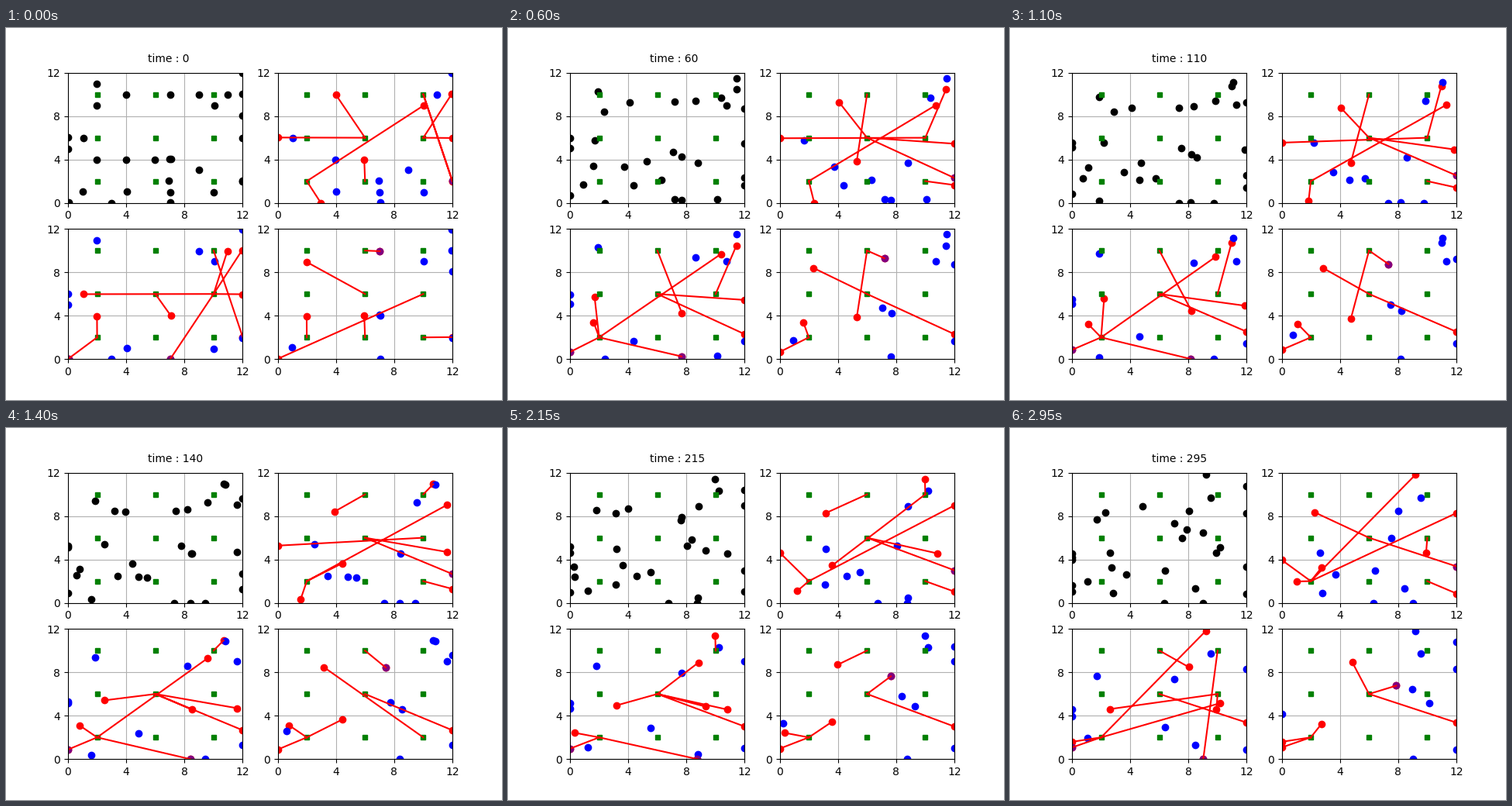
These frames come from a looping animation (640 by 480 pixels, 3000 ms). A matplotlib script:

```python
import matplotlib.pyplot as plt
import numpy as np
from matplotlib.animation import FuncAnimation

FRAMES, INTERVAL, TICK = 60, 50, 5
SIZE, STRIDE = 12, 0.0558

SITES = [(x, y) for y in (2, 6, 10) for x in (2, 6, 10)]
SW, S, SE, W, C, E, NW, N, NE = range(9)

# Start point, then headings in degrees spread evenly over the loop.
WALKERS = [
    (0, 0, 50, 176, 174, 172),
    (0, 5, 174, 175, 178, 250),
    (0, 6, 160, 238, 228, 230),
    (1, 1, 90, 120, 100),
    (1, 6, -18, -22, -32, -222),
    (2, 4, 260, 186, 250, 246),
    (2, 9, -95, 12, 18, 12),
    (2, 11, -95),
    (3, 0, 230, 155, 108, 97),
    (4, 10, -82, -88, -188, -183),
    (4, 4, 249),
    (4, 1, 57, 64, 28, -5),
    (6, 4, 193),
    (7, 4, 110, 28, 48, 46),
    (7, 4, 20),
    (9, 3, 104, 128),
    (7, 2, 169),
    (7, 1, -74, -74, -150, -100),
    (7, 0, 45, -35, -72, -72),
    (7, 10, -75),
    (9, 10, 240, 239, 215),
    (10, 1, -55, -140, -235, -255),
    (10, 9, 0, 1, 0, -95),
    (11, 10, 207),
    (12, 12, 223),
    (12, 10, 142, 152),
    (12, 8, 80, 75, 85, -10),
    (12, 6, -25, -115, -185, -182),
    (12, 2, 24),
    (12, 2, -32, -8),
]

# Site each walker links to from a given time on; all others use SW.
ROUTES = {
    3: {0: C, 60: E, 178: SW},
    5: {0: E, 60: SW, 112: C, 238: E},
    7: {0: C, 112: SE, 178: N, 238: C},
    10: {0: C, 112: N, 238: C},
    13: {0: S, 18: SW, 60: N, 112: SW, 178: NE, 238: SW},
    15: {0: C, 18: N, 112: C, 238: E, 278: SW},
    19: {0: E, 18: SW, 278: NE},
    20: {0: N, 178: C},
    24: {0: E, 18: SW, 178: C, 278: N},
    26: {0: E, 112: NE, 238: E, 278: SW},
    28: {0: E, 60: C, 238: E},
    29: {0: NE, 60: C},
    30: {0: NE, 18: SE},
}
LAST_ROUTES = {
    **ROUTES,
    1: {0: E, 18: SW},
    13: {0: S, 18: SE, 60: N, 112: SW},
    29: {0: SE, 18: NE, 60: C},
}


def walk(x, y, *headings):
    """Constant stride along a turning heading, sliding along the walls."""
    keys = np.linspace(0, 1, len(headings))
    angles = np.radians(np.interp(np.linspace(0, 1, FRAMES), keys, headings))
    spot, track = np.array([x, y], float), []
    for a in angles:
        spot = np.clip(spot + STRIDE * np.array([np.cos(a), np.sin(a)]), 0, SIZE)
        track.append(spot)
    return track


TRACKS = {k: walk(*w) for k, w in enumerate(WALKERS, 1)}


class Layer:
    """A group of walkers drawn as dots of one colour."""

    def __init__(self, ax, keys, color):
        self.keys = keys
        self.art, = ax.plot([], [], "o", color=color, ms=6)

    def draw(self, i):
        self.art.set_data(*zip(*(TRACKS[k][i] for k in self.keys)))


class Links:
    """Lines from walkers to their current sites."""

    def __init__(self, ax, keys, routes):
        self.routes = {k: routes.get(k, {0: SW}) for k in keys}
        self.art, = ax.plot([], [], color="red", lw=1.5, zorder=2.5)

    def draw(self, i):
        ends = []
        for key, hops in self.routes.items():
            site = hops[max(t for t in hops if t <= i * TICK)]
            ends += [TRACKS[key][i], SITES[site], (np.nan, np.nan)]
        self.art.set_data(*zip(*ends))


def link_view(ax, linked, idle, marked, routes=ROUTES):
    return [Layer(ax, linked, "red"), Layer(ax, idle, "blue"),
            Layer(ax, marked, "purple"), Links(ax, linked, routes)]


fig, axes = plt.subplots(2, 2, figsize=(6.4, 4.8), dpi=100)
overview, first, second, third = axes.flat
label = overview.text(5.5, 13, "")

parts = [
    Layer(overview, list(TRACKS), "black"),
    *link_view(first, [3, 9, 10, 13, 23, 26, 28, 29, 30],
               [5, 11, 12, 16, 17, 18, 19, 22, 24, 25], [29]),
    *link_view(second, [1, 5, 6, 15, 19, 24, 26, 28, 29],
               [2, 3, 8, 9, 12, 21, 22, 23, 25, 30], [1, 19]),
    *link_view(third, [1, 6, 7, 13, 20, 29],
               [4, 14, 15, 19, 23, 25, 26, 27, 30], [20], LAST_ROUTES),
]

for ax in axes.flat:
    ax.plot(*zip(*SITES), "s", color="green", ms=4.5)
    ax.set(xlim=(0, SIZE), ylim=(0, SIZE),
           xticks=range(0, 13, 4), yticks=range(0, 13, 4))
    ax.grid(True)


def update(i):
    label.set_text(f"time : {i * TICK}")
    for part in parts:
        part.draw(i)


anim = FuncAnimation(fig, update, frames=FRAMES, interval=INTERVAL,
                     init_func=lambda: None, repeat=True, repeat_delay=0)
plt.show()
```
